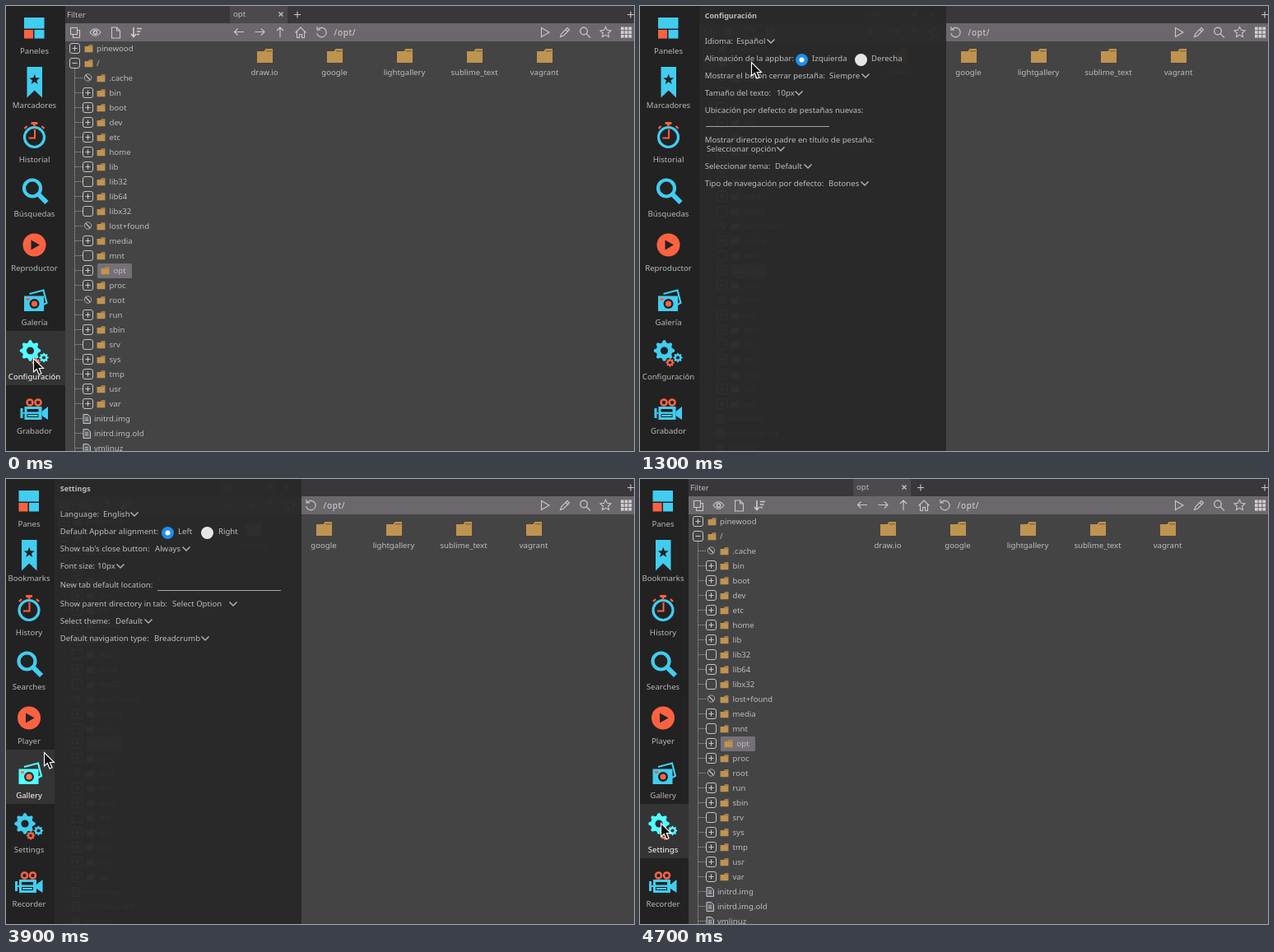
An HTML page for the animation above (5700 ms loop, 763 by 541 pixels).

```html
<!DOCTYPE html>
<html lang="es">
<head>
<meta charset="utf-8">
<title>File manager settings</title>
<style>
html, body { margin: 0; width: 100%; height: 100%; overflow: hidden; background: #444; }
svg { display: block; }
text { font: 9.6px "Noto Sans", "Noto Sans CJK JP", sans-serif; fill: #bdbdbd; white-space: pre; }
.mid { text-anchor: middle; }
.title { font-size: 9px; font-weight: bold; }
.path { font-size: 10px; letter-spacing: .7px; fill: #d8d8d8; }
.line { fill: none; stroke: #c8c8c8; stroke-width: 1.1; }
.dots { fill: none; stroke: #a5a5a5; stroke-dasharray: 1 1; }
.hover { filter: brightness(1.28); }
</style>
</head>
<body>
<svg id="stage" width="763" height="541" viewBox="0 0 763 541"></svg>
<script>
const LOOP = 5700, STEP = 100;
const BLUE = '#41cdf0', ORANGE = '#fc6241', DARK = '#222', GOLD = '#bf9350';

const LANGS = {
  es: {
    side: 72,
    labels: ['Paneles', 'Marcadores', 'Historial', 'Búsquedas', 'Reproductor', 'Galería', 'Configuración', 'Grabador'],
    title: 'Configuración',
    // label, baseline, value, value x, chevron x
    rows: [
      ['Idioma:', 46, 'Español', 117, 159],
      ['Alineación de la appbar:', 67, 'Izquierda', 209],
      ['Mostrar el botón cerrar pestaña:', 88, 'Siempre', 230, 274],
      ['Tamaño del texto:', 109, '10px', 166, 193],
      ['Ubicación por defecto de pestañas nuevas:', 130],
      ['Mostrar directorio padre en título de pestaña:', 166],
      ['', 177, 'Seleccionar opción', 81, 171],
      ['Seleccionar tema:', 198, 'Default', 164, 204],
      ['Tipo de navegación por defecto:', 219, 'Botones', 229, 273]
    ],
    other: ['Derecha', 281, 268.5], field: [80, 146.5], menu: [114, 53], checked: 1
  },
  en: {
    side: 59,
    labels: ['Panes', 'Bookmarks', 'History', 'Searches', 'Player', 'Gallery', 'Settings', 'Recorder'],
    title: 'Settings',
    rows: [
      ['Language:', 46, 'English', 118, 156],
      ['Default Appbar alignment:', 67, 'Left', 209],
      ["Show tab's close button:", 88, 'Always', 181, 219],
      ['Font size:', 109, '10px', 111, 139],
      ['New tab default location:', 132],
      ['Show parent directory in tab:', 155, 'Select Option', 202, 276],
      ['Select theme:', 176, 'Default', 133, 173],
      ['Default navigation type:', 197, 'Breadcrumb', 180, 242]
    ],
    other: ['Right', 258, 244.5], field: [184, 135.5], menu: [115, 49], checked: 0
  }
};

const DIRS = '.cache bin boot dev etc home lib lib32 lib64 libx32 lost+found media mnt opt proc root run sbin srv sys tmp usr var'.split(' ');
const LOCKED = ['.cache', 'lost+found', 'root'];
const EMPTY = ['lib32', 'libx32', 'mnt', 'srv'];

// Pointer stops: time, x, y
const POINTER = [
  [0, 33, 428], [100, 33, 430], [600, 33, 430], [1000, 121, 167], [1300, 135, 68],
  [1600, 143, 45], [1700, 143, 45], [1800, 143, 43], [2000, 143, 43], [2400, 143, 57],
  [3400, 143, 57], [4000, 27, 387], [4200, 25, 418], [LOOP, 25, 418]
];

const text = (x, y, s, cls = '', fill = '') =>
  `<text x="${x}" y="${y}" class="${cls}"${fill && ` style="fill:${fill}"`}>${s}</text>`;
const rect = (x, y, w, h, fill, r = 0) =>
  `<rect x="${x}" y="${y}" width="${w}" height="${h}" fill="${fill}" rx="${r}"/>`;
const shape = (d, fill) => `<path d="${d}" fill="${fill}"/>`;
const line = (d, cls = 'line') => `<path d="${d}" class="${cls}"/>`;
const stroke = (d, color, w) => `<path d="${d}" fill="none" stroke="${color}" stroke-width="${w}"/>`;
const disc = (x, y, r, fill) => `<circle cx="${x}" cy="${y}" r="${r}" fill="${fill}"/>`;
const ring = (x, y, r, color, w) =>
  `<circle cx="${x}" cy="${y}" r="${r}" fill="none" stroke="${color}" stroke-width="${w}"/>`;
const at = (x, y, s, extra = '') => `<g transform="translate(${x} ${y}) ${extra}">${s}</g>`;

// Closed figure with points at varying radii
function spokes(n, radius, start = -Math.PI / 2) {
  const pts = Array.from({ length: n }, (_, i) => {
    const a = start + i * 2 * Math.PI / n, r = radius(i);
    return (r * Math.cos(a)).toFixed(2) + ',' + (r * Math.sin(a)).toFixed(2);
  });
  return 'M' + pts.join('L') + 'Z';
}
const star = (r, inner = .42) => spokes(10, i => i % 2 ? r * inner : r);
const gear = (x, y, r, color) =>
  at(x, y, shape(spokes(32, i => i % 4 < 2 ? r : r * .78, -1.67), color) + disc(0, 0, r * .36, DARK));

const folder = (x, y, size) => at(x, y,
  shape('M-9.5,-6H-1L1,-9H9.5V8H-9.5Z', GOLD) + stroke('M1.5,-6.2H8.5', '#6c5a3d', 1), `scale(${size})`);
const chevron = (x, y) => stroke(`M${x - 4.5},${y - 2}l4.5,4.5l4.5,-4.5`, '#b0b0b0', 1.5);

// Sidebar icons, centred on x = 0 inside a 66 px row
const ICONS = [
  rect(-12.5, 14, 24.5, 13.5, BLUE) + rect(-12.5, 29, 11, 10.5, ORANGE) + rect(0, 29, 12, 10.5, BLUE),
  shape('M-9,8H9.5V45.5L.2,36.5L-9,45.5Z', BLUE) + at(.2, 23.5, shape(star(6.8), DARK)),
  ring(0, 27.5, 12, BLUE, 3.2) + rect(-4, 9, 8, 3, ORANGE, 1) + rect(-1.3, 11, 2.6, 4, ORANGE)
    + stroke('M9,14l3,3M-9,14l-3,3', ORANGE, 2.4) + stroke('M.5,18V28.500H-7', ORANGE, 2),
  ring(-2.5, 23.5, 10, BLUE, 4.2) + stroke('M5,31L15,41', BLUE, 6),
  disc(0, 26.5, 14, ORANGE) + shape('M-4,20.5V32.5L6.5,26.5Z', DARK),
  stroke('M-6,20L11,15.500L15,31L11,33', BLUE, 2.2) + rect(-12.5, 22.5, 24, 18.5, BLUE)
    + rect(-10, 25, 4, 3, ORANGE) + disc(0, 32, 6, DARK) + disc(0, 32, 3.6, ORANGE),
  gear(-5, 23, 12.7, BLUE) + gear(2, 37.5, 5.2, ORANGE) + gear(11.5, 31.5, 5.8, BLUE),
  ring(-5.5, 20, 3.5, ORANGE, 2.6) + ring(4.5, 20, 3.5, ORANGE, 2.6) + rect(-12, 25, 21, 16, BLUE)
    + shape('M9,31L16.5,25V41L9,36Z', BLUE) + rect(-17, 27, 3, 12, BLUE) + rect(-14, 32, 2, 2, BLUE)
    + rect(-9, 28, 14, 3.5, DARK) + stroke('M-9,36H5', DARK, 4) + stroke('M-8,36H4', BLUE, 2)
];

function sidebar(L, px, py) {
  const active = px < L.side ? Math.floor((py + 1) / 66) : -1;
  const cx = L.side / 2 - 1.5;
  return rect(0, 0, L.side, 541, DARK) + L.labels.map((label, i) => {
    const on = i === active;
    return (on ? rect(0, i * 66 - 1, L.side, 66, '#343434') : '')
      + at(cx, i * 66, `<g class="${on ? 'hover' : ''}">${ICONS[i]}</g>`)
      + text(cx, i * 66 + 58, label, 'mid', on ? '#fff' : '#b8b8b8');
  }).join('');
}

function toggle(x, y, kind) {
  if (kind === 'locked') return ring(x + .5, y, 4.2, '#aaa', 1) + line(`M${x - 2.5},${y - 3}l6,6`);
  const sign = { plus: `M${x - 2.5},${y + .5}h6M${x + .5},${y - 2.5}v6`, minus: `M${x - 2.5},${y + .5}h6` }[kind] || '';
  return `<rect x="${x - 5.5}" y="${y - 5.5}" width="12" height="12" rx="2.5" fill="#444" stroke="#c4c4c4"/>` + line(sign);
}

function tree() {
  let s = line('M83.5,76V541', 'dots')
    + toggle(83, 51, 'plus') + folder(100.5, 52, .52) + text(110, 55, 'pinewood')
    + toggle(83, 69, 'minus') + folder(100.5, 70, .52) + text(110, 73, '/');
  DIRS.forEach((name, i) => {
    const y = 87 + 18 * i, picked = name === 'opt', dx = picked ? 5 : 0;
    const kind = LOCKED.includes(name) ? 'locked' : EMPTY.includes(name) ? 'empty' : 'plus';
    s += line(`M84,${y + .5}H93`, 'dots') + toggle(99, y, kind)
      + (picked ? rect(111, y - 8, 42, 18, '#757077', 1.5) : '')
      + folder(115.5 + dx, y + 1, .52) + text(125.5 + dx, y + 4, name);
  });
  ['initrd.img', 'initrd.img.old', 'vmlinuz'].forEach((name, i) => {
    const y = 501 + 18 * i;
    s += line(`M84,${y + .5}H93`, 'dots')
      + `<path d="M94,${y - 4.5}h5.5l3,3v8h-8.5z" fill="#5b6168" stroke="#c4c4c4"/>`
      + line(`M96,${y}h4M96,${y + 2.5}h4`) + text(107, y + 4, name);
  });
  return s;
}

// Parts that move along with the sidebar width
function content() {
  return rect(272, 0, 70, 21, '#4c484c') + text(74, 14, 'Filter') + text(276, 13, 'opt')
    + stroke('M331.5,7.5l5,5m0,-5l-5,5', '#bbb', 1.5) + line('M350,10.5h8M354,6.5v8')
    + line('M78.5,26.5h8v8h-8zM81.5,34.5v4h8v-9h-3')
    + line('M102,32Q108.5,23.5 115,32Q108.5,40.5 102,32Z') + ring(108.5, 32, 2.2, '#ccc', 1.4)
    + line('M128.5,26h6l4,4v9h-10zM134.5,26v4h4')
    + stroke('M155,26v11m-3,-3l3,3.5l3,-3.5M159,27.5h6M159,31h4.5M159,34.5h3', '#ccc', 1.6)
    + line('M289,31.5H277.5m4,-4l-4,4l4,4M302.5,31.5H314m-4,-4l4,4l-4,4M333,38V26m-4,4l4,-4l4,4')
    + line('M351.5,32.5L358,26l6.5,6.5M353.5,31v7.5h3v-4h3v4h3V31')
    + line('M379,28.5A5.7,5.7 0 1 1 377.8,33M378,25v4h4')
    + text(398.5, 36, '/opt/', 'path') + tree()
    + ['draw.io', 'google', 'lightgallery', 'sublime_text', 'vagrant'].map((name, i) =>
      folder(314.5 + 85 * i, 61, 1) + text(314 + 85 * i, 84, name, 'mid')).join('');
}

function toolbarRight() {
  let grid = '';
  for (let i = 0; i < 9; i++) grid += rect(747 + i % 3 * 4.7, 25.5 + Math.floor(i / 3) * 4.7, 3.7, 3.7, '#d0d0d0');
  return line('M755,10.5h8M759,6.5v8') + line('M650.5,26.5V37.5L660,32Z')
    + line('M673.5,37.5l1.5,-4l7,-7l2.5,2.5l-7,7zM680,28.5l2.5,2.5')
    + ring(702, 30.5, 4.3, '#ccc', 1.2) + line('M705,33.5l5,5')
    + at(728.5, 32, line(star(6.8, .48))) + grid;
}

function panel(L, width) {
  if (width < .5) return '';
  const x = L.side + 6.7, [fx, fy] = L.field, [other, ox, radio] = L.other;
  const rows = L.rows.map(([label, y, value, vx, cx]) =>
    text(x, y, label) + (value ? text(vx, y, value) : '') + (cx ? chevron(cx, y - 3.5) : '')).join('');
  return `<clipPath id="open"><rect x="${L.side}" width="${width.toFixed(1)}" height="541"/></clipPath><g clip-path="url(#open)">`
    + `<g opacity=".95">${rect(L.side, 0, 300, 541, '#292929')}</g>`
    + text(x, 15, L.title, 'title') + rows
    + disc(196.5, 65.5, 7.5, '#1d8ff0') + disc(196.5, 65.5, 3, '#fff')
    + disc(radio, 65.5, 7.5, '#e6e6e6') + text(ox, 67, other)
    + stroke(`M${fx},${fy}h150`, '#a4a4a4', 1) + '</g>';
}

function menu(L, py) {
  const [x, w] = L.menu;
  return rect(x, 37, w, 13, 'rgba(255,255,255,.08)') + rect(x, 50, w, 51, '#505050', 1.5)
    + (py >= 50 ? rect(x, 50, w, 16, '#5e5e5e', 1.5) : '')
    + ['English', 'Español', '日本語'].map((name, i) => text(x + 3.3, 62 + 16.3 * i, name, '', i ? '#a8a8a8' : '')).join('')
    + stroke(`M${x + w - 11},${58.5 + 16 * L.checked}l2,2.5l3.5,-6`, '#bbb', 1.1);
}

const pointer = (x, y) => at(x + .5, y + .5,
  '<path d="M0,0V16.5L3.8,13L6.5,19.5L9.5,18.2L6.8,12H12Z" fill="#111" stroke="#fff" stroke-width="1.1"/>');

function pointerAt(t) {
  const i = POINTER.findIndex(p => p[0] > t);
  const [t0, x0, y0] = POINTER[i - 1], [t1, x1, y1] = POINTER[i];
  const k = (t - t0) / (t1 - t0);
  return [x0 + (x1 - x0) * k, y0 + (y1 - y0) * k];
}

// cubic-bezier(.25, .1, .25, 1)
function ease(x) {
  if (x <= 0 || x >= 1) return x <= 0 ? 0 : 1;
  const curve = (u, a, b) => 3 * (1 - u) * (1 - u) * u * a + 3 * (1 - u) * u * u * b + u * u * u;
  let lo = 0, hi = 1;
  for (let i = 0; i < 20; i++) {
    const mid = (lo + hi) / 2;
    if (curve(mid, .25, .25) < x) lo = mid; else hi = mid;
  }
  return curve(lo, .1, 1);
}

const FIXED_BACK = rect(0, 0, 763, 541, '#444') + rect(0, 0, 763, 21, '#3a373a') + rect(0, 21, 763, 22, '#6c676c');
const FIXED_RIGHT = toolbarRight(), CONTENT = content();

function picture(t) {
  const L = t < 3200 ? LANGS.es : LANGS.en;
  const [px, py] = pointerAt(t);
  const width = 300 * (ease((t - 440) / 300) - ease((t - 4380) / 300));
  return FIXED_BACK + FIXED_RIGHT + at(L.side - 72, 0, CONTENT) + panel(L, width)
    + sidebar(L, px, py) + (t >= 2000 && t < 3300 ? menu(L, py) : '')
    + pointer(Math.round(px), Math.round(py));
}

const stage = document.getElementById('stage');
const began = performance.now();
let shown = -1;
function tick() {
  const t = Math.floor((performance.now() - began) % LOOP / STEP) * STEP;
  if (t !== shown) stage.innerHTML = picture(shown = t);
  requestAnimationFrame(tick);
}
tick();
</script>
</body>
</html>
```
